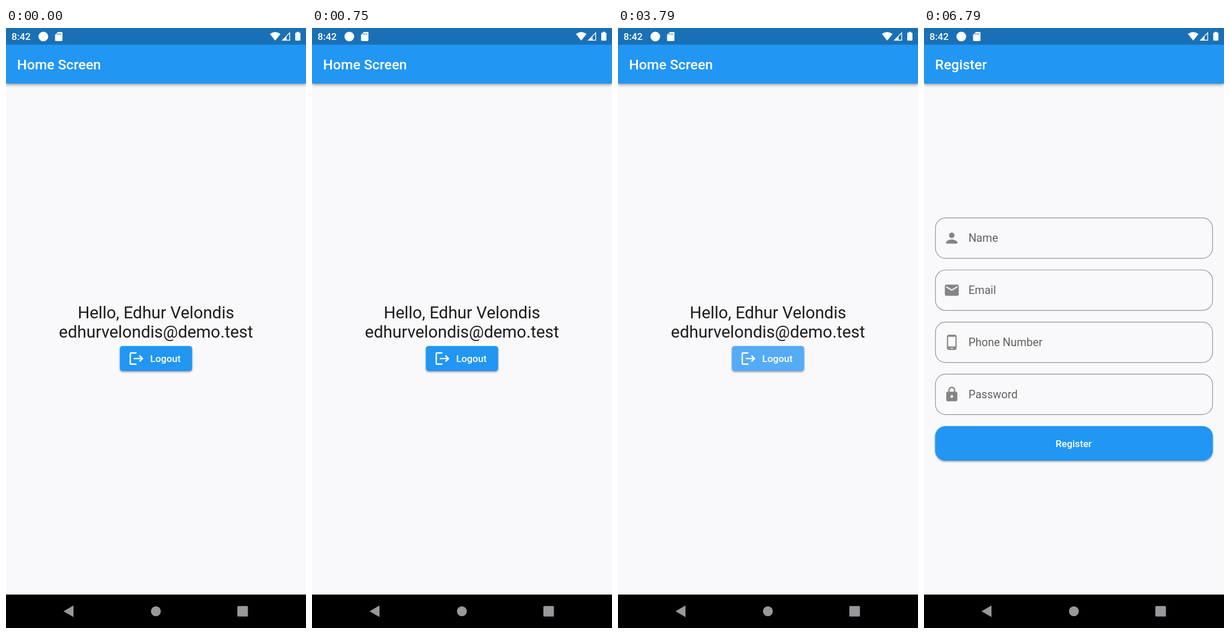
An HTML page for the animation above (6920 ms loop, 529 px wide and 1058 px high).

```html
<!DOCTYPE html>
<html lang="en">
<head>
<meta charset="utf-8">
<title>Logout flow</title>
<style>
  html, body { margin: 0; width: 100%; height: 100%; overflow: hidden; background: #f9f9fb; }
  svg { display: block; width: 100vw; height: 100vh; font-family: Roboto, sans-serif; }
  .medium { font-weight: 500; fill: #fff; }
  .title { font-size: 24.5px; }
  .label { font-size: 17.15px; }
  .hello { font-size: 29.4px; fill: #1c1c1d; }
  .hint { font-size: 19.6px; fill: #626262; }
  .box { fill: none; stroke: #929292; stroke-width: 1.2; }
  .icon { fill: #858585; }
  .mid { text-anchor: middle; }
</style>
</head>
<body>
<svg viewBox="0 0 529 1058">
  <defs>
    <filter id="barShadow" x="-5%" y="-20%" width="110%" height="160%">
      <feDropShadow dx="0" dy="2.4" stdDeviation="2.4" flood-color="#000" flood-opacity=".38"/>
    </filter>
    <filter id="buttonShadow" x="-10%" y="-30%" width="120%" height="180%">
      <feDropShadow dx="0" dy="1.8" stdDeviation="1.5" flood-color="#000" flood-opacity=".36"/>
    </filter>
  </defs>

  <rect width="529" height="1058" fill="#f9f9fb"/>
  <rect y="29" width="529" height="69" fill="#2196f3" filter="url(#barShadow)"/>
  <rect width="529" height="29.4" fill="#1a70b6"/>

  <g fill="#fff">
    <text class="medium" x="9.7" y="21.2" font-size="17.15">8:42</text>
    <circle cx="65.8" cy="15" r="8.6"/>
    <path d="M91.6 7H98q1.5 0 1.5 1.5v13q0 1.5-1.5 1.5H88q-1.5 0-1.5-1.5V12z"/>
    <path d="M90.6 12v-2.6M93.5 12V9.4M96.4 12V9.4" stroke="#1a70b6" stroke-width="1.3"/>
    <path d="M465.3 10.6q9.4-7.4 18.8 0L474.7 22.3z"/>
    <path d="M501 6.8V22.2H485.8zM499.6 10.3 494.8 15.1V20.8H499.6z" fill-rule="evenodd"/>
    <path d="M512.6 8.3V6.8h4v1.5h1.4q1.2 0 1.2 1.2v11.6q0 1.2-1.2 1.2h-6.8q-1.2 0-1.2-1.2V9.5q0-1.2 1.2-1.2z"/>
  </g>

  <text id="title" class="medium title" x="19.6" y="72.8"></text>

  <g id="home">
    <text class="hello mid" x="264.5" y="512">Hello, Edhur Velondis</text>
    <text class="hello mid" x="264.5" y="546.4">edhurvelondis@demo.test</text>
    <rect id="logout" x="200.7" y="560.8" width="127.6" height="44.1" rx="4.9" filter="url(#buttonShadow)"/>
    <path fill="#fff" transform="translate(215.4 568.2) scale(1.2245)" d="M17 7l-1.41 1.41L18.17 11H8v2h10.17l-2.58 2.58L17 17l5-5zM4 5h8V3H4c-1.1 0-2 .9-2 2v14c0 1.1.9 2 2 2h8v-2H4V5z"/>
    <text class="medium label mid" x="281.2" y="588.9">Logout</text>
  </g>

  <g id="register">
    <g id="fields"></g>
    <rect x="19.6" y="701.9" width="489.8" height="61.2" rx="18.4" fill="#2196f3" filter="url(#buttonShadow)"/>
    <text class="medium label mid" x="264" y="738.5">Register</text>
  </g>

  <rect y="999" width="529" height="59" fill="#000"/>
  <g fill="#99989b">
    <path d="M101.5 1028.5 119 1018.3V1038.7z"/>
    <circle cx="264.3" cy="1028.5" r="8.7"/>
    <rect x="408" y="1019.2" width="18.6" height="18.6" rx="1.5"/>
  </g>
</svg>
<script>
const LOOP = 6920;
const PRESS = 3440, PRESS_TIME = 100;
const LEAVE = 4500;

const fields = [
  ['Name', 'M12 12c2.21 0 4-1.79 4-4s-1.79-4-4-4-4 1.79-4 4 1.79 4 4 4zm0 2c-2.67 0-8 1.34-8 4v2h16v-2c0-2.66-5.33-4-8-4z'],
  ['Email', 'M20 4H4c-1.1 0-2 .9-2 2v12c0 1.1.9 2 2 2h16c1.1 0 2-.9 2-2V6c0-1.1-.9-2-2-2zm0 4l-8 5-8-5V6l8 5 8-5v2z'],
  ['Phone Number', 'M16 1H8C6.34 1 5 2.34 5 4v16c0 1.66 1.34 3 3 3h8c1.66 0 3-1.34 3-3V4c0-1.66-1.34-3-3-3zm-2 20h-4v-1h4v1zm3.25-3H6.75V4h10.5v14z'],
  ['Password', 'M18 8h-1V6c0-2.76-2.24-5-5-5S7 3.24 7 6v2H6c-1.1 0-2 .9-2 2v10c0 1.1.9 2 2 2h12c1.1 0 2-.9 2-2V10c0-1.1-.9-2-2-2zm-6 9c-1.1 0-2-.9-2-2s.9-2 2-2 2 .9 2 2-.9 2-2 2zm3.1-9H8.9V6c0-1.71 1.39-3.1 3.1-3.1s3.1 1.39 3.1 3.1v2z']
];

const byId = id => document.getElementById(id);
const title = byId('title'), home = byId('home');
const register = byId('register'), logout = byId('logout');

byId('fields').innerHTML = fields.map(([name, path], i) => {
  const mid = 370.5 + i * 91.85;
  return `<rect class="box" x="20.2" y="${mid - 35.6}" width="488.6" height="71.2" rx="17.8"/>
    <path class="icon" transform="translate(34.3 ${mid - 14.7}) scale(1.2245)" d="${path}"/>
    <text class="hint" x="78.4" y="${mid + 6.5}">${name}</text>`;
}).join('');

const mix = (from, to, k) => from + (to - from) * k;

function draw(t) {
  const onHome = t < LEAVE;
  const press = Math.min(1, Math.max(0, (t - PRESS) / PRESS_TIME));
  home.style.display = onHome ? '' : 'none';
  register.style.display = onHome ? 'none' : '';
  title.textContent = onHome ? 'Home Screen' : 'Register';
  logout.setAttribute('fill', `rgb(${mix(33, 84, press)}, ${mix(150, 171, press)}, ${mix(243, 245, press)})`);
}

const start = performance.now();
function tick() {
  draw((performance.now() - start) % LOOP);
  requestAnimationFrame(tick);
}
tick();
</script>
</body>
</html>
```
